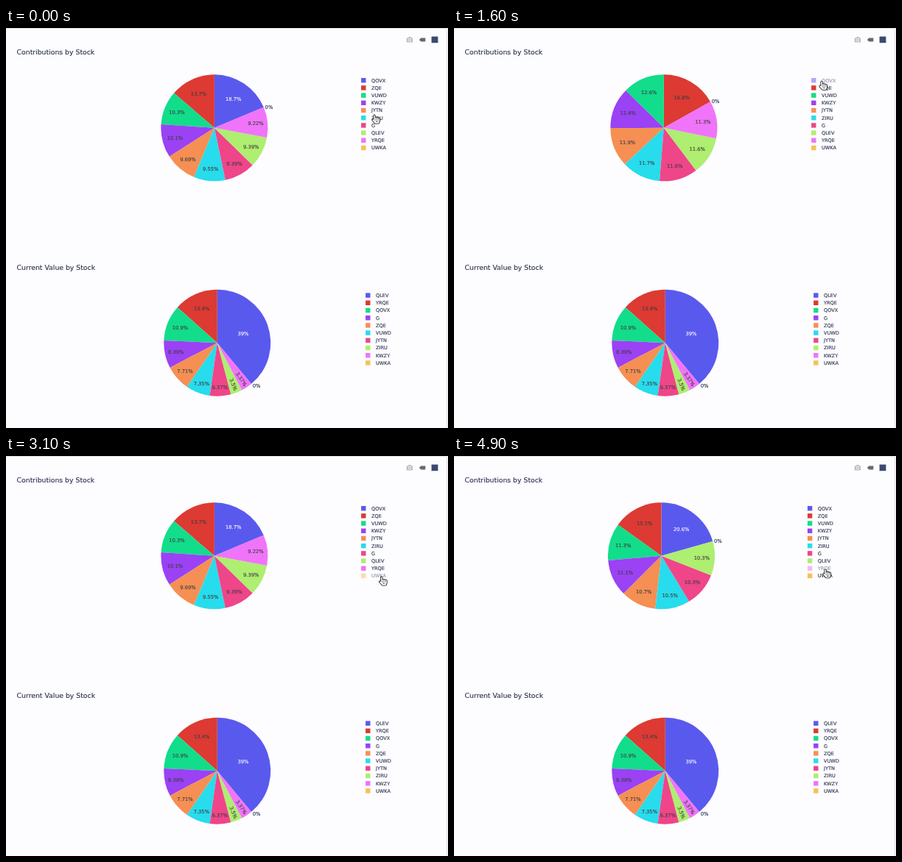
These frames come from a looping animation (600x544 px, 5 s). An HTML page:

```html
<!DOCTYPE html>
<html lang="en">
<head>
<meta charset="utf-8">
<title>Stock pies</title>
<style>
  html, body { margin: 0; width: 100%; height: 100%; overflow: hidden; background: #fdfcfe; }
  svg { display: block; width: 600px; height: 544px; font-family: "DejaVu Sans", Verdana, sans-serif; }
  text { fill: #262e4c; stroke: #262e4c; stroke-width: .12px; }
  .title { font-size: 9.3px; }
  .legend { font-size: 6.6px; }
  .pct { font-size: 6.75px; text-anchor: middle; fill: #3f3f42; stroke: #3f3f42; }
  .light { fill: #fff; stroke: #fff; }
  .outer { font-size: 6.75px; }
  #hand path { fill: none; stroke-linecap: round; stroke-linejoin: round; }
</style>
</head>
<body>
<svg viewBox="0 0 600 544">
  <rect width="600" height="544" fill="#fdfcfe"/>
  <path d="M0 .5H598.5V544" fill="none" stroke="#dedde0"/>

  <!-- toolbar -->
  <path d="M543.8 13.4h2l.8-1.3h2.9l.8 1.3h1.8v6h-8.3z" fill="#bcbbbe"/>
  <circle cx="548" cy="16.2" r="1.9" fill="none" stroke="#fdfcfe" stroke-width=".9"/>
  <path d="M560.8 16l2.5-2.6h6v5.2h-6z" fill="#69686b"/>
  <rect x="577.6" y="11.6" width="8.8" height="8.6" fill="#3c4a70"/>

  <text class="title" x="14.6" y="36.3">Contributions by Stock</text>
  <text class="title" x="14.6" y="328.9">Current Value by Stock</text>
  <g id="top"></g>
  <g id="bottom"></g>
  <g id="hand"></g>
</svg>
<script>
const LOOP = 5000, STEP = 100, R = 72.5, ROW = 10.2, TAU = 2 * Math.PI;
const COLORS = ['#5a59ee', '#dc3a33', '#12dd8b', '#9a42f4', '#f58f53',
                '#27dcec', '#ef4589', '#aeee70', '#f074f9', '#f5c252'];
const el = id => document.getElementById(id);

const contributions = {
  node: el('top'), cy: 135.8,
  names: 'QOVX ZQE VUWD KWZY JYTN ZIRU G QLEV YRQE UWKA'.split(' '),
  values: [18.7, 13.68, 10.27, 10.1, 9.69, 9.55, 9.39, 9.39, 9.22, 0]
};
const current = {
  node: el('bottom'), cy: 428.2,
  names: 'QLEV YRQE QOVX G ZQE VUWD JYTN ZIRU KWZY UWKA'.split(' '),
  values: [39, 13.4, 10.9, 8.39, 7.71, 7.35, 6.37, 3.5, 3.37, 0]
};
const rowY = (chart, row) => chart.cy - 64.6 + row * ROW;

// The hand travels to a legend row, then the row is hidden for a while;
// shift is how far the legend moves to the right meanwhile
const visits = [
  { leave: 100, arrive: 700, x: 499, row: 0, hide: 1000, show: 1700, shift: 3 },
  { leave: 1900, arrive: 3000, x: 509.7, row: 9, hide: 3100, show: 4100, shift: 0 },
  { leave: 3700, arrive: 4500, x: 504, row: 8, hide: 4700, show: LOOP, shift: -2.2 }
];

const percent = share => +(share * 100).toPrecision(3) + '%';
const polar = (a, r) => [r * Math.sin(a), -r * Math.cos(a)];
const label = (cls, x, y, text, turn = 0) =>
  `<text class="${cls}" x="${x}" y="${y + 2.4}" transform="rotate(${turn} ${x} ${y})">${text}</text>`;

function slice(cx, cy, from, to, color) {
  const [x1, y1] = polar(from, R), [x2, y2] = polar(to, R);
  const large = to - from > Math.PI ? 1 : 0;
  return `<path fill="${color}" d="M${cx} ${cy}l${x1} ${y1}A${R} ${R} 0 ${large} 1 ${cx + x2} ${cy + y2}Z"/>`;
}

// Place a label in the slice's inscribed circle, or along the radius when it is too thin
function innerLabel(cx, cy, mid, share, light) {
  const text = percent(share), half = Math.PI * Math.min(share, .5);
  const w = text.length * 4.35, h = 8.1;
  const fit = 1 / (1 + 1 / Math.sin(half));
  let r = 1 - fit, turn = 0;
  if (2 * fit * R < Math.hypot(w, h)) {
    const aspect = w / h, q = aspect + 1 / (2 * Math.tan(half));
    const m = 1 / (Math.sqrt(q * q + .5) + q);
    r = Math.cos(m) - m * aspect;
    turn = (mid * 360 / TAU + 720) % 180 - 90;
  }
  const [dx, dy] = polar(mid, r * R);
  return label(light ? 'pct light' : 'pct', cx + dx, cy + dy, text, turn);
}

function drawChart(chart, shift, hidden) {
  const { cy, names, values } = chart;
  const cx = 282.9 + shift * .65, legendX = 482.1 + shift;
  const shown = values.map((_, i) => i).filter(i => i !== hidden);
  const total = shown.reduce((sum, i) => sum + values[i], 0);
  let end = values[shown[0]] / total * TAU, pie = '', text = '';
  for (const i of shown) {
    const share = values[i] / total, start = end - share * TAU, mid = (start + end) / 2;
    if (share) {
      pie += slice(cx, cy, start, end, COLORS[i]);
      text += innerLabel(cx, cy, mid, share, i === 0);
    } else {
      const [dx, dy] = polar(mid, R);
      text += label('outer', cx + dx + 1.8, cy + dy + .5 - 3 * Math.cos(mid), '0%');
    }
    end = start;
  }
  const legend = names.map((name, i) => {
    const y = rowY(chart, i);
    return `<g opacity="${i === hidden ? .5 : 1}">` +
      `<rect x="${legendX}" y="${y - 3.2}" width="6.4" height="6.4" fill="${COLORS[i]}"/>` +
      label('legend', legendX + 13.9, y, name) + '</g>';
  });
  chart.node.innerHTML = pie + text + legend.join('');
}

// Four fingers, thumb and palm: a dark line with a white one on top
function drawHand() {
  let d = 'M-2 7L1 10.5M1.4 9V10.9H5.5V9';
  for (let i = 0; i < 4; i++) d += `M${i * 2.1} ${i ? 3.9 + i * .5 : 1.2}V9`;
  el('hand').innerHTML = `<path d="${d}" stroke="#111" stroke-width="3.2"/>` +
    `<path d="${d}" stroke="#fff" stroke-width="1.6"/>`;
}

function handAt(t) {
  let x = 500, y = 118;
  for (const v of visits) {
    const k = Math.min(1, Math.max(0, (t - v.leave) / (v.arrive - v.leave)));
    const e = k * k * (3 - 2 * k);
    x += (v.x - x) * e;
    y += (rowY(contributions, v.row) + 1 - y) * e;
  }
  return [x, y];
}

let active = null;
function render(now) {
  const t = Math.floor(now % LOOP / STEP) * STEP;
  const visit = visits.find(v => t >= v.hide && t < v.show);
  if (visit !== active) {
    active = visit;
    drawChart(contributions, visit ? visit.shift : 0, visit ? visit.row : -1);
  }
  el('hand').setAttribute('transform', `translate(${handAt(t)})`);
}

drawChart(current, 6, -1);
drawHand();
const begin = performance.now();
function tick() {
  render(performance.now() - begin);
  requestAnimationFrame(tick);
}
tick();
</script>
</body>
</html>
```
